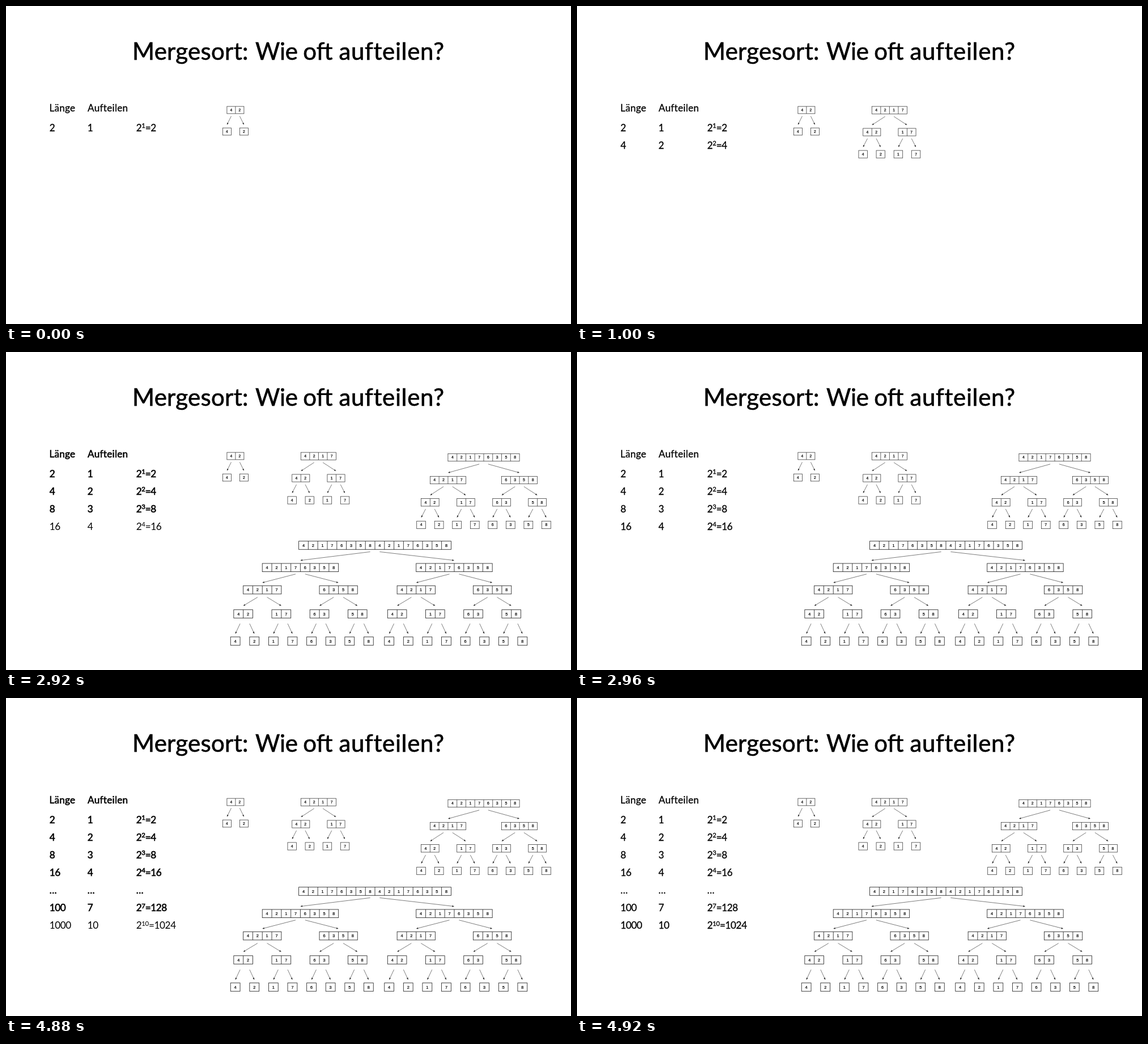
These frames come from a looping animation (997 px wide and 561 px high, 5.88 s). An HTML page:

```html
<!DOCTYPE html>
<html lang="de">
<head>
<meta charset="utf-8">
<title>Mergesort</title>
<style>
html, body { margin: 0; width: 100%; height: 100%; overflow: hidden; background: #fff; }
svg { display: block; width: 100vw; height: 100vh; }
.title { font: 42px Lato, Carlito, sans-serif; stroke: #000; stroke-width: .65px; }
.table { font: 17.1px Lato, Carlito, sans-serif; stroke: #000; stroke-width: .3px; }
.table.heavy { stroke-width: .6px; }
.table.light { stroke-width: 0; }
.num { letter-spacing: -.38px; }
.sup { font-size: 11.4px; }
.tree { fill: none; stroke: #222; }
.tree text { font-family: "Liberation Sans", Arial, sans-serif; text-anchor: middle; fill: #000; stroke: #000; stroke-width: .22px; }
.arrow { stroke: #333; stroke-width: .65px; }
.head { fill: #222; stroke: none; }
</style>
</head>
<body>
<svg id="stage" viewBox="0 0 997 561"></svg>
<script>
const LOOP = 5880, HEAVY_MS = 40;
const starts = [0, 1000, 1960, 2920, 3920, 4880];
const heavyStages = [3, 5];
const svg = document.getElementById('stage');

function add(parent, tag, attrs, text) {
  const el = document.createElementNS('http://www.w3.org/2000/svg', tag);
  for (const key in attrs) el.setAttribute(key, attrs[key]);
  if (text) el.textContent = text;
  parent.append(el);
  return el;
}

const tables = starts.map(() => add(svg, 'g', { class: 'table' }));
const trees = starts.map(() => add(svg, 'g', { class: 'tree' }));

// Title
const title = add(svg, 'g', { class: 'title' });
[['Mergesort:', 223, .3], ['Wie', 440, -.3], ['oft', 524.3, 0], ['aufteilen?', 587.5, .65]].forEach(([word, x, gap]) =>
  add(title, 'text', { x, y: 95, 'letter-spacing': gap }, word));

// Table
add(tables[0], 'text', { x: 76.5, y: 186, 'letter-spacing': .25 }, 'Länge');
add(tables[0], 'text', { x: 144, y: 186, 'letter-spacing': .3 }, 'Aufteilen');

function row(stage, index, length, splits) {
  const g = add(tables[stage], 'g', { class: 'num' });
  const y = 220.7 + 31.1 * index;
  const put = (x, text) => add(g, 'text', { x, y }, text);
  put(76.7, length);
  put(143.7, splits);
  if (splits === '…') return put(229.7, '…');
  put(229.7, '2');
  add(g, 'text', { x: 239.3, y: y - 5.6, class: 'sup' }, splits);
  put(239.4 + 6.3 * splits.length, '=' + 2 ** splits);
}
row(0, 0, '2', '1');
row(1, 1, '4', '2');
row(2, 2, '8', '3');
row(3, 3, '16', '4');
row(4, 4, '…', '…');
row(4, 5, '100', '7');
row(5, 6, '1000', '10');

// Trees
function arrow(g, x1, y1, x2, y2) {
  const len = Math.hypot(x2 - x1, y2 - y1);
  const ux = (x2 - x1) / len, uy = (y2 - y1) / len;
  const bx = x2 - ux * 3.6, by = y2 - uy * 3.6;
  add(g, 'path', { class: 'arrow', d: `M${x1} ${y1}L${bx} ${by}` });
  add(g, 'path', {
    class: 'head',
    d: `M${x2} ${y2}L${bx - uy * 1.4} ${by + ux * 1.4}L${bx + uy * 1.4} ${by - ux * 1.4}Z`
  });
}

function tree(stage, { digits, cx, cell, height, ys, shift = 0, leafShift = 0, spread = 0, line = .7 }) {
  const g = add(trees[stage], 'g', { 'stroke-width': line });
  const n = digits.length, last = ys.length - 1;

  function nodeX(level, i) {
    const count = 2 ** level;
    let x = cx + (i - (count - 1) / 2) * 2 * cell * n / count;
    if (level) x += shift + (i < count / 2 ? -spread : spread);
    return level === last ? x + leafShift : x;
  }

  ys.forEach((y, level) => {
    const size = n / 2 ** level, w = size * cell;
    const offset = level === last - 1 ? leafShift : 0;
    const middle = (y + ys[level + 1]) / 2 - .6 + offset;
    const half = 7.6 + offset / 2;
    for (let i = 0; i < 2 ** level; i++) {
      const x = nodeX(level, i), left = x - w / 2;
      add(g, 'rect', { x: left, y: y - height / 2, width: w, height });
      for (let k = 0; k < size; k++) {
        if (k) add(g, 'path', { d: `M${left + k * cell} ${y - height / 2}v${height}` });
        add(g, 'text', { x: left + (k + .5) * cell, y: y + cell * .155, 'font-size': cell * .44 }, digits[i * size + k]);
      }
      if (level === last) continue;
      for (const side of [0, 1])
        arrow(g, x + offset + (side - .5) * cell, middle - half, nodeX(level + 1, 2 * i + side), middle + half);
    }
  });
}
const eight = '42176358';
tree(0, { digits: '42', cx: 404.9, cell: 15, height: 12.8, ys: [183.5, 221.5] });
tree(1, { digits: '4217', cx: 551.4, cell: 15.55, height: 13.2, ys: [183.7, 222.5, 261.5] });
tree(2, { digits: eight, cx: 843, cell: 15.77, height: 13.4, ys: [186, 226, 265.3, 305] });
tree(3, {
  digits: eight + eight, cx: 651, cell: 16.8, height: 14.6, ys: [341, 380.3, 419.6, 462, 510],
  shift: 4.2, leafShift: 2.8, spread: 1.35, line: .85
});

// Playback
const show = (el, on) => el.setAttribute('visibility', on ? 'visible' : 'hidden');

function draw(now) {
  const t = now % LOOP;
  const stage = starts.filter(s => s <= t).length - 1;
  const fresh = heavyStages.includes(stage) && t - starts[stage] < HEAVY_MS;
  starts.forEach((_, i) => {
    show(tables[i], i <= stage);
    show(trees[i], i <= stage);
    tables[i].classList.toggle('heavy', fresh && i < stage);
    tables[i].classList.toggle('light', fresh && i === stage);
  });
}

const begin = performance.now();
function tick() {
  draw(performance.now() - begin);
  requestAnimationFrame(tick);
}
tick();
</script>
</body>
</html>
```
